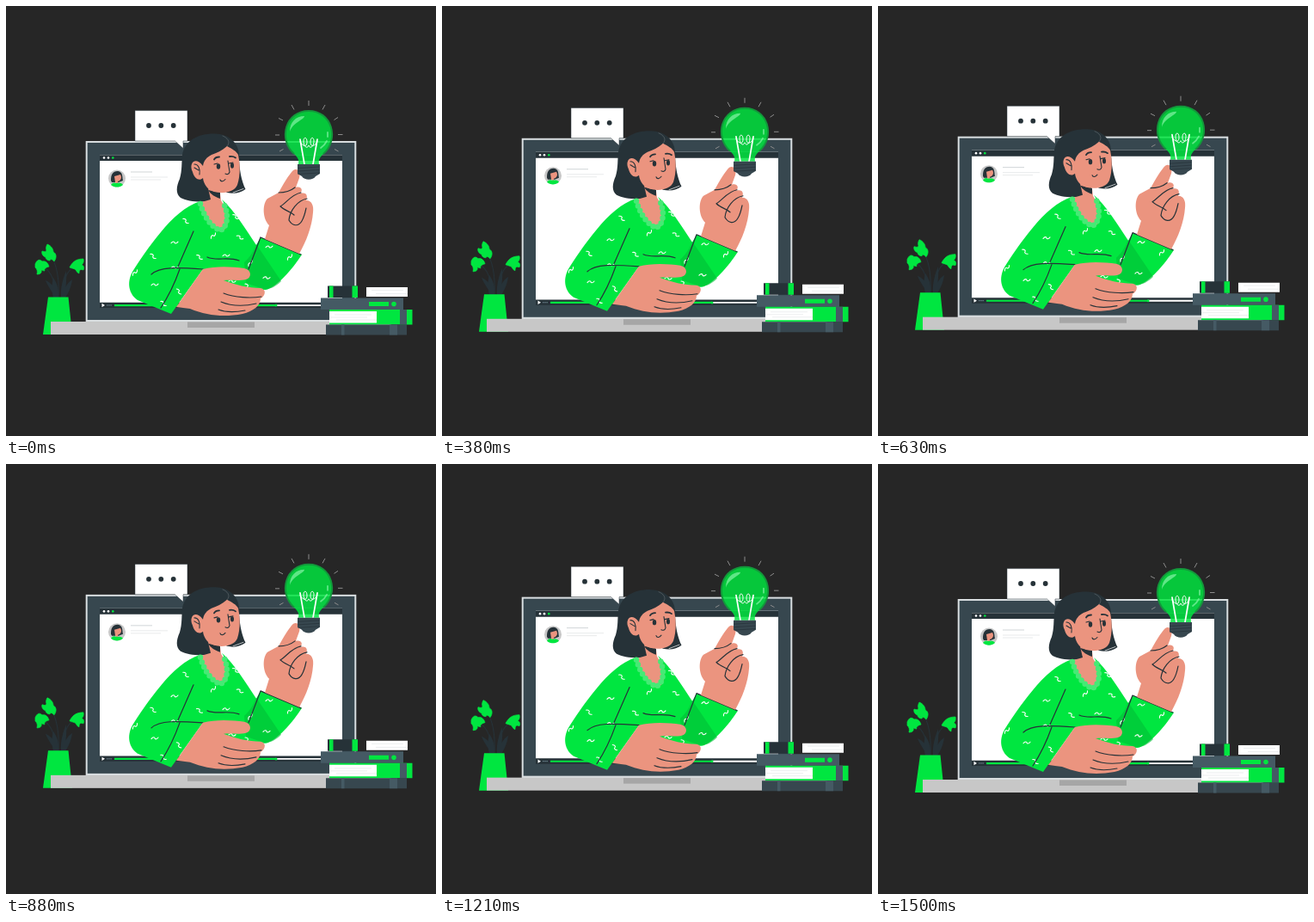
Animation, 500 px wide and 500 px high, one loop 1.54 s. Source, as an HTML page:

```html
<!DOCTYPE html>
<html lang="en">
<head>
<meta charset="utf-8">
<title>Floating lesson</title>
<style>
  html, body { margin: 0; height: 100%; overflow: hidden; background: #262626; }
  svg { display: block; width: 100vw; height: 100vh; }
  .green { fill: #00e640; }
  .ink { fill: #263238; }
  .slate { fill: #37474f; }
  .steel { fill: #455a64; }
  .skin { fill: #eb947f; }
  .white { fill: #fff; }
  .line { fill: none; stroke: #263238; stroke-linecap: round; stroke-linejoin: round; }
  .glow { fill: none; stroke: #fff; stroke-linecap: round; stroke-linejoin: round; }
</style>
</head>
<body>
<svg viewBox="0 0 500 500">
  <g id="scene">
    <g id="plant">
      <path class="line" stroke-width="1.1" d="M61 339C62 318 60 302 52 290M58 339C58 322 53 309 44 304M66 339C66 320 71 307 80 303"/>
      <path class="ink" d="M57 339C53 331 48 325 46 319C53 322 59 329 60 339ZM55 339C53 333 53 323 55 316C60 323 62 331 61 339ZM64 339C63 329 66 317 70 308C71 320 69 332 67 339ZM66 339C67 329 71 322 77 318C76 327 72 335 69 339Z"/>
      <path class="green" stroke="#00e640" stroke-width=".7" stroke-linejoin="round" d="M42 285C45 286 47 286 47 284C46 281 47 279 48 277C53 279 55 283 55 286C59 288 59 293 56 297C53 294 52 294 51 296C48 296 46 294 46 292C43 291 41 288 42 285Z
        M34 300C36 295 39 294 42 297C46 296 49 299 50 303C46 304 44 306 45 308C43 308 42 307 41 307C42 311 39 312 36 312C37 308 36 306 34 304Z
        M74 304C77 298 81 294 90 294C91 298 89 300 88 301C91 302 91 305 90 307C87 306 85 306 85 311C82 310 82 307 80 306Z"/>
      <path class="green" d="M49 338.500H72.500L77 382H43Z"/>
    </g>

    <g id="laptop">
      <rect x="92.700" y="157" width="314.600" height="211" fill="#d9dee0"/>
      <rect class="slate" x="94.700" y="159" width="310.600" height="206"/>
      <rect class="white" x="109" y="173" width="282" height="177"/>
      <path class="ink" d="M109 173.200H391V180H109ZM109 344.700H391V351H109Z"/>
      <g class="white"><circle cx="114" cy="176.500" r="1.300"/><circle cx="119" cy="176.500" r="1.300"/></g>
      <circle class="green" cx="124.300" cy="176.500" r="1.300"/>
      <path class="white" d="M111.500 345.800L115 348L111.500 350.200ZM314 347.200H380V349H314Z"/>
      <path stroke="#78909c" stroke-dasharray="1.500 .7" d="M117 348H123.500"/>
      <path class="green" d="M126 347H314V349.200H126Z"/>
      <circle class="green" cx="314" cy="348.100" r="1.500"/>
      <rect x="52" y="367" width="396" height="15" fill="#c7c7c7"/>
      <rect x="211" y="367.500" width="78" height="6.500" fill="#a6a6a6"/>
      <g id="profile">
        <circle cx="129" cy="200.500" r="10" fill="#c7c7c7"/>
        <path class="ink" d="M122 203C122 196 124 192 130 192C136 193 135 198 136 203L131 205L123 205Z"/>
        <path class="skin" d="M126 198L133 196C135 199 134 203 130 204L130 207L127 205Z"/>
        <path class="green" d="M122 208C124 205 126 205 128 206C131 206 134 205 136 208C132 211.500 126 211.500 122 208Z"/>
        <path stroke="#d0d5d7" d="M145 193H170"/>
        <path stroke="#e8eaeb" d="M145 199H188M145 202H180"/>
      </g>
    </g>

    <g id="bubble">
      <path class="white" stroke="#263238" stroke-width=".5" d="M150 121.600H211V157H206V165.500L196.500 157H150Z"/>
      <g class="ink"><circle cx="166" cy="139" r="2.900"/><circle cx="180.300" cy="139" r="2.900"/><circle cx="194.700" cy="139" r="2.900"/></g>
    </g>

    <g id="woman">
      <path class="ink" d="M205 173C208 156 224 148 243 148.500C259 149 271 159 271 174C271 190 274 204 278.500 213C273 217 266 219 257 217L248 211V224C237 229 214 229 203 223C197 218 198 210 202 201C205 191 204 182 205 173Z"/>
      <path class="glow" stroke-width=".7" d="M264 217L276 212.500"/>
      <path class="skin" d="M235 212L249 218L250 226L262 246L254 264L242 264L224 229L238 225Z"/>
      <path class="ink" d="M235 214L249 217V224C243 222 238 219 235 214Z"/>
      <path class="green" d="M226 227C208 233 194 246 180 263C166 280 155 296 147 309C140 322 143 335 153 342L192 358L229 306L240 330H285L302 330C314 328 334 305 344 289L296 269L291 278C279 260 265 237 251 225C261 241 261 258 250 263C239 258 231 243 226 227Z"/>
      <path d="M291 277L320 320C313 327 306 330 299 329L279 322L277 298C284 292 288 285 291 277Z" fill="#00be36" opacity=".6"/>
      <path fill="none" stroke="#45ea75" stroke-width="6.500" stroke-linecap="round" stroke-dasharray="0 6" d="M226 230C230 244 238 257 249 261C257 258 260 244 253 229"/>
      <g id="squiggles" class="glow" stroke-width="1.100"></g>
      <path class="line" stroke-width="1.200" d="M218 262L200 303M169 312C179 303 198 304 229 306M180 351C188 339 196 323 202 306M296 269L282 306M296 269L343 289M234 292C245 297 258 291 271 296"/>

      <path class="skin" d="M229 306C243 302 264 303 277 305C286 307 286 316 279 318C270 320 262 318 253 319C266 324 282 328 296 328C303 329 302 337 296 340C296 348 288 355 275 358C253 362 234 360 214 352L198 350Z"/>
      <path class="line" stroke-width="1.100" d="M253 334C266 339 284 340 297 338M250 344C262 349 278 349 291 346M247 353C257 357 268 356 278 354"/>

      <path class="skin" d="M301 271L306 255C298 247 298 230 304 224L317 217C323 206 329 196 334 191C339 188 343 193 341 200L337 211C343 209 346 214 342 218C350 216 351 221 349 226C356 226 358 233 357 240C356 256 349 274 341 288Z"/>
      <path class="line" stroke-width="1.200" d="M317 217C324 217 331 215 336 211M319 233C326 229 332 219 343 217M319 233C324 238 331 239 335 243M329 249C330 238 339 226 350 224M329 249C333 256 340 257 344 250C347 245 348 240 349 235"/>

      <path class="skin" d="M229 186C220 174 212 183 217 193C219 201 225 204 229 200C230 208 235 214 242 216C253 219 266 216 269 208C273 196 272 183 270 173C268 169 263 166 257 163C251 168 245 171 239 173C233 176 230 180 229 186Z"/>
      <path class="line" stroke-width="1.100" d="M219 184C224 184 226 190 225 196M219 188L224 191"/>
      <path class="line" stroke-width="1.800" d="M242 178.500C243 176.500 245 175.500 248 175.500M260 175C263 174.500 265 175 267 176.500"/>
      <path class="line" stroke-width="1.100" d="M258 180L260 193C259 196 257 196 255 195M249 202C250 205 253 204 255 201.500M242 184L246 183M259 183L264 182"/>
      <ellipse class="ink" cx="247" cy="186.500" rx="2.200" ry="3.200"/>
      <ellipse class="ink" cx="263" cy="185.500" rx="2" ry="3.200"/>
      <path class="glow" stroke-width=".5" opacity=".35" d="M257 163C262 158 257 153 252 151"/>
    </g>

    <g id="bulb">
      <path fill="none" stroke="#8c8c8c" d="M352 110V116M332 115L335 120.500M371 115L368 120.500M317 130.500L322 133M386 129.500L381.500 132.500M313 150H318M386 149.500H391.500M318 169L322.500 166.500M382 166.500L386.500 169"/>
      <path class="green" opacity=".84" d="M340 184C341 178 339 176 334 171C316 155 325 122 352 122C379 122 388 155 370 171C365 176 363 178 364 184Z"/>
      <path fill="none" stroke="#13983b" stroke-width="2" d="M335 172C316 155 325 122 352 122C379 122 388 155 369 172"/>
      <path fill="#7df0a0" opacity=".75" d="M330 146C330 135 337 128 347 128C347 132 334 135 330 146Z"/>
      <path fill="none" stroke="#7df0a0" stroke-width="1.800" stroke-linecap="round" opacity=".75" d="M374 147V152M373 157C371 161 369 163 366 165"/>
      <path class="glow" stroke-width="1.700" d="M342 155L347 184M362 155L357 184"/>
      <path class="glow" d="M342 158C345 163 350 165 350 158C350 152 346 152 346 157C346 163 350 167 352 162C354 167 358 163 358 157C358 152 354 152 354 158C354 165 359 163 362 158"/>
      <path class="slate" d="M339 184H365V195L360 198C357 203 347 203 344 198L339 195Z"/>
      <path class="line" stroke-width=".7" d="M340 188.500L364 187M340 192L364 190.500M340 195.500L364 194"/>
    </g>

    <g id="books">
      <path class="ink" d="M374 325.500H409V339H374Z"/>
      <path class="green" d="M376 325.500H380.500V339H376ZM402.500 325.500H409V339H402.500Z"/>
      <path class="white" d="M419 327H467V338H419Z"/>
      <path class="steel" d="M366 339.500H462V353H366Z"/>
      <path class="green" d="M422 344H445V349H422ZM376 353H472.500V370.500H376Z"/>
      <circle class="green" cx="451" cy="346.500" r="2.800"/>
      <path class="white" d="M376 355H431V368.500H376Z"/>
      <path stroke="#e3e6e7" stroke-width=".7" d="M425 330.500H462M430 334.500H467M382 359H425M376 362H420M384 365H431"/>
      <path class="steel" d="M458 353H466V370.500H458Z"/>
      <path class="slate" d="M372 370.500H466V382.500H372Z"/>
      <path class="steel" d="M390 370.500H393.500V382.500H390ZM446 370.500H455V382.500H446Z"/>
    </g>
  </g>
</svg>
<script>
  const LOOP = 1540, PEAK = 745, LIFT = 6.3;
  const scene = document.getElementById("scene");

  // x, y, angle of each squiggle on the blouse
  const marks = [
    [209, 250, 50], [241, 267, -40], [196, 275, 0], [171, 291, 50], [225, 292, 45], [173, 324, 0],
    [201, 332, 60], [272, 269, 35], [256, 290, 0], [284, 299, -50], [306, 280, 0], [303, 316, 5],
    [330, 292, -40], [281, 326, 55], [150, 310, -40], [196, 304, 0], [183, 346, 50], [267, 245, 45],
    [263, 320, 10]
  ];
  document.getElementById("squiggles").innerHTML = marks.map(([x, y, angle]) =>
    `<path transform="translate(${x} ${y}) rotate(${angle})" d="M-4 .8C-2-2 0-1 0 0S2 2 4-.8"/>`
  ).join("");

  function draw() {
    const t = performance.now() % LOOP;
    const rise = LIFT * Math.max(0, 1 - Math.abs(t - PEAK) / PEAK);
    scene.setAttribute("transform", `translate(0 ${-rise.toFixed(3)})`);
    requestAnimationFrame(draw);
  }
  draw();
</script>
</body>
</html>
```
